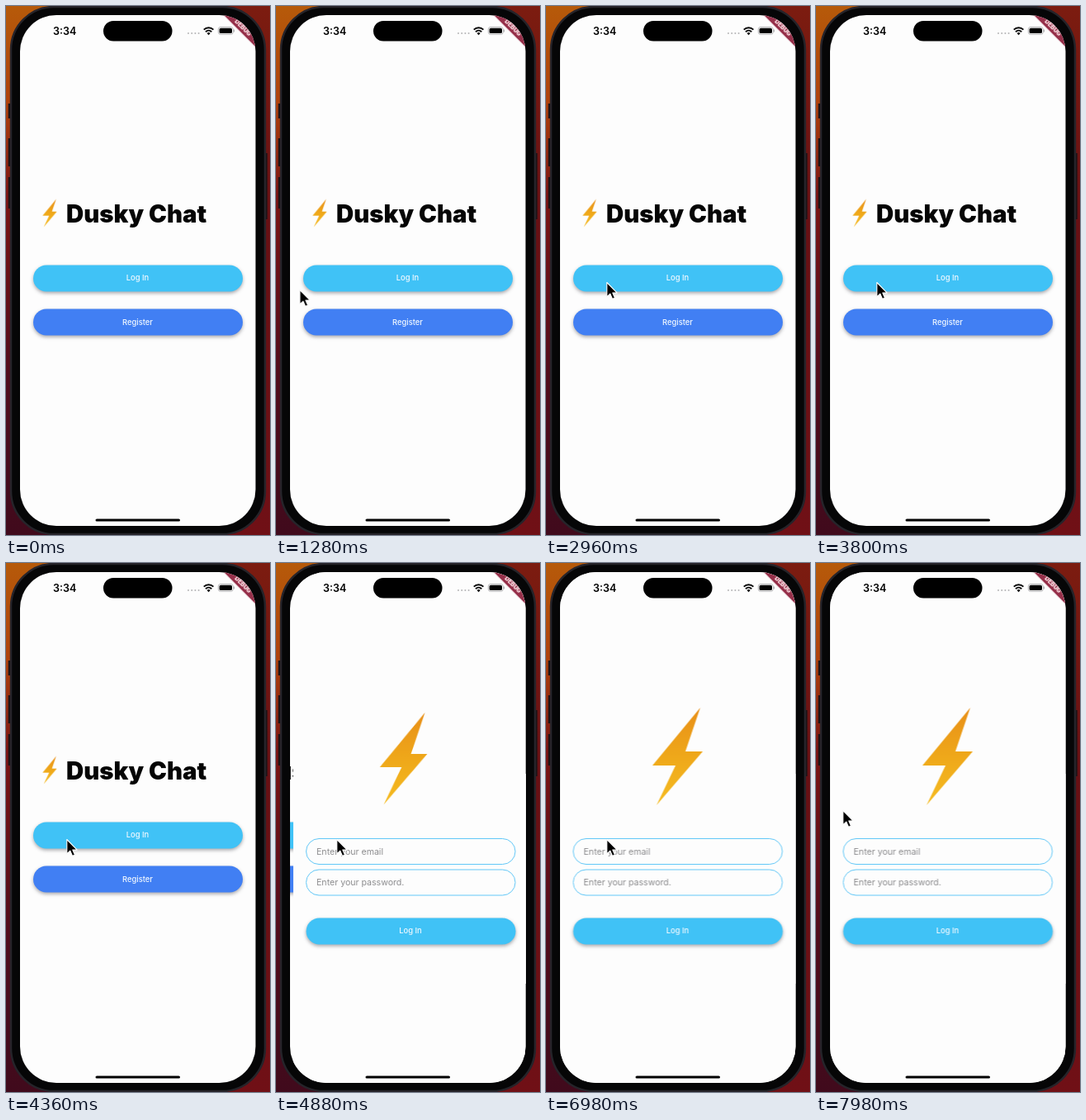
Recreate the animation shown at these times as an HTML page. Size 320 px wide and 640 px high, loop 8000 ms.

```html
<!DOCTYPE html>
<html lang="en">
<head>
<meta charset="utf-8">
<title>Chat app login</title>
<style>
  html, body { margin: 0; width: 100%; height: 100%; overflow: hidden; background: #5a1018; }
  svg { display: block; width: 320px; height: 640px; font-family: Inter, Roboto, sans-serif; }
  .paper { fill: #fdfdfd; }
  .title { font-size: 29.3px; font-weight: 900; fill: #050505; }
  .label { font-size: 9.4px; font-weight: 500; fill: #f4faff; text-anchor: middle; }
  .hint { font-size: 10.6px; fill: #8c8c8e; }
  .field { fill: none; stroke: #62c8f8; stroke-width: 1; }
  .pill { filter: drop-shadow(0 2.5px 2px rgba(50, 50, 60, .42)); }
  .cyan { fill: #40c2f6; }
  .blue { fill: #417ff3; }
  .clock { font-size: 12.5px; font-weight: 600; }
  .debug { font-size: 7.2px; font-weight: 900; fill: #ffe6ea; text-anchor: middle; }
</style>
</head>
<body>
<svg viewBox="0 0 320 640">
  <defs>
    <linearGradient id="wallLeft" x2="0" y2="1">
      <stop offset="0" stop-color="#b65a0a"/>
      <stop offset=".18" stop-color="#b0420c"/>
      <stop offset=".36" stop-color="#7c1414"/>
      <stop offset=".7" stop-color="#520c1c"/>
      <stop offset="1" stop-color="#400a1c"/>
    </linearGradient>
    <linearGradient id="wallRight" x2="0" y2="1">
      <stop offset="0" stop-color="#7c1c10"/>
      <stop offset=".4" stop-color="#681014"/>
      <stop offset="1" stop-color="#701016"/>
    </linearGradient>
    <linearGradient id="gold" x2="0" y2="1">
      <stop offset="0" stop-color="#e88f18"/>
      <stop offset=".5" stop-color="#efa81a"/>
      <stop offset="1" stop-color="#f5bc22"/>
    </linearGradient>
    <clipPath id="screen"><rect x="17" y="11" width="285.5" height="618" rx="44"/></clipPath>
  </defs>

  <rect width="160" height="640" fill="url(#wallLeft)"/>
  <rect x="160" width="160" height="640" fill="url(#wallRight)"/>
  <path d="M4 118v18M4 160v34M4 207v38M315.5 178v80" stroke="#1c1216" stroke-width="2.5"/>
  <rect x="6" y="1" width="308" height="638" rx="52" fill="#060607" stroke="#26242a" stroke-width="2.5"/>

  <g clip-path="url(#screen)">
    <rect class="paper" width="320" height="640"/>
    <g id="welcome">
      <text class="title" x="73" y="261.7">Dusky Chat</text>
      <rect class="pill cyan" x="33" y="313.5" width="254" height="32" rx="16"/>
      <text class="label" x="159.5" y="332.4">Log In</text>
      <rect class="pill blue" x="33" y="366.5" width="254" height="32" rx="16"/>
      <text class="label" x="159.5" y="385.6">Register</text>
    </g>
    <g id="login">
      <rect class="paper" x="17" width="286" height="640"/>
      <rect class="field" x="33" y="333.5" width="253.5" height="31" rx="15.5"/>
      <text class="hint" x="45.5" y="352.5">Enter your email</text>
      <rect class="field" x="33" y="371" width="253.5" height="31" rx="15.5"/>
      <text class="hint" x="45.5" y="389.7">Enter your password.</text>
      <rect class="pill cyan" x="33" y="429.5" width="254" height="32" rx="16"/>
      <text class="label" x="159.5" y="448.2">Log In</text>
    </g>

    <g id="boltX"><g id="boltY"><g id="boltSize">
      <path d="M27.5-59 9.5-6H30.5L-25.5 59-2.5 11H-30.5Z" fill="url(#gold)"/>
    </g></g></g>

    <g transform="translate(302.5 11) rotate(45)">
      <rect x="-40" y="16.8" width="80" height="10.4" fill="#96304a"/>
      <text class="debug" x="0" y="24.4">DEBUG</text>
    </g>
  </g>

  <rect x="118" y="18" width="83.5" height="24.5" rx="12.2"/>
  <text class="clock" x="57" y="34.6">3:34</text>
  <path d="M221 33h14" stroke="#b4b4b6" stroke-width="2" stroke-linecap="round" stroke-dasharray="0 4.2"/>
  <g fill="none" stroke="#080808" stroke-width="2">
    <path d="M239.8 28.6a8.2 8.2 0 0 1 11.6 0M242 31.2a5.1 5.1 0 0 1 7.2 0"/>
  </g>
  <path d="M245.6 35.2 243.6 33a2.9 2.9 0 0 1 4 0Z"/>
  <rect x="257.3" y="25.4" width="18" height="9" rx="2.8" fill="none" stroke="#a8a8aa" stroke-width=".8"/>
  <rect x="258.6" y="26.7" width="15.4" height="6.4" rx="1.7"/>
  <path d="M276.4 28.4v3" stroke="#a8a8aa" stroke-width="1.1"/>
  <rect x="108.5" y="620.4" width="102.5" height="3.2" rx="1.6"/>

  <g id="cursor">
    <path d="M.8 .5V17.8L4.8 14.2 7.5 20.4 10.4 19.1 7.8 13.1H13.2Z" stroke="#fff" stroke-width="1.1" stroke-linejoin="round"/>
  </g>
</svg>

<script>
  const LOOP = 8000, PUSH = 4530, PUSH_TIME = 500, WIDTH = 285.5;
  const END = PUSH + PUSH_TIME;

  const move = (id, steps) => document.getElementById(id).animate(
    steps.map(([ms, transform, easing = "linear"]) => ({ offset: ms / LOOP, transform, easing })),
    { duration: LOOP, iterations: Infinity });

  const at = (x, y = 0) => `translate(${x}px, ${y}px)`;

  // Fast start, long settling: two joined curves.
  const slide = (id, from, to) => move(id, [
    [0, at(from)],
    [PUSH, at(from), "cubic-bezier(.283,.044,.545,.57)"],
    [PUSH + .198 * PUSH_TIME, at(from + (to - from) * .541), "cubic-bezier(.209,1,.435,.976)"],
    [END, at(to)],
    [LOOP, at(to)]
  ]);

  const fly = (id, from, to, easing) => move(id, [
    [0, from], [PUSH, from, easing], [END, to], [LOOP, to]
  ]);

  slide("welcome", 0, -WIDTH / 3);
  slide("login", WIDTH, 0);

  // Separate easings bend the flight into an arc.
  fly("boltX", at(53), at(159.5), "cubic-bezier(.3,0,.1,1)");
  fly("boltY", at(0, 250.5), at(0, 234), "cubic-bezier(.5,0,.5,1)");
  fly("boltSize", "scale(.285)", "scale(1)", "cubic-bezier(.4,0,.3,1)");

  move("cursor", [
    [0, at(-16, 350)],
    [1080, at(-16, 350), "ease-in"],
    [1280, at(28, 343), "ease-out"],
    [1750, at(71, 338)],
    [2220, at(71, 338), "ease-in-out"],
    [2700, at(73, 334)],
    [7450, at(73, 334), "ease-in"],
    [7980, at(32, 299)],
    [LOOP, at(30, 297)]
  ]);
</script>
</body>
</html>
```
